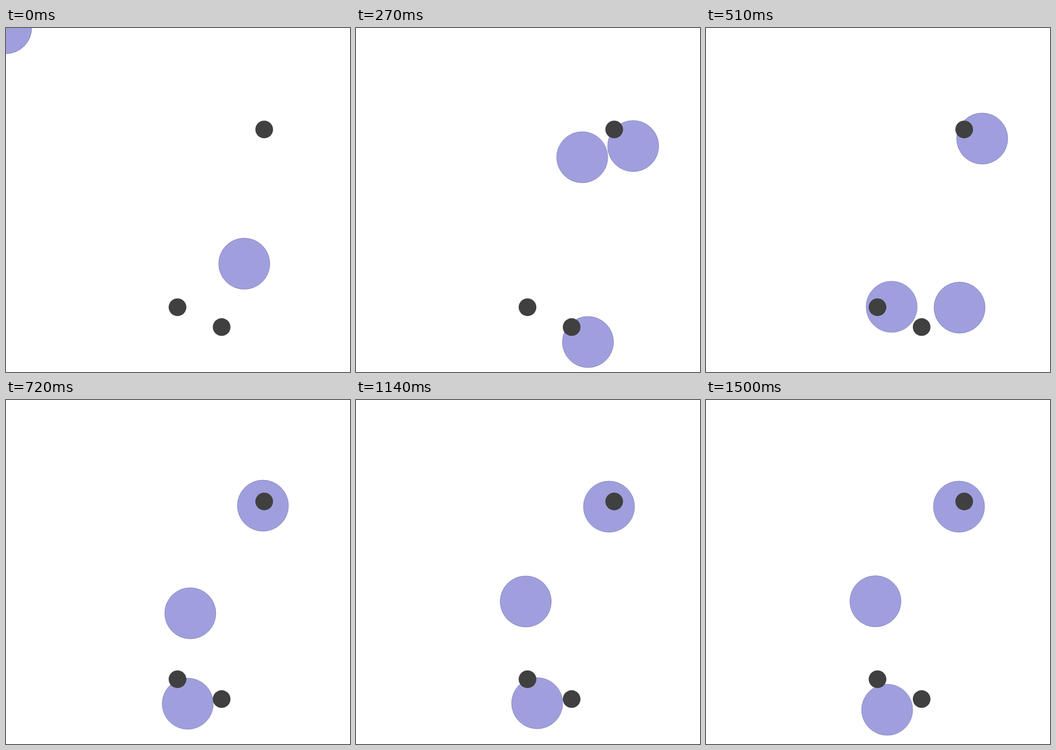
An HTML page without scripts for the animation above (1530 ms loop, 700 by 700 pixels).

```html
<!DOCTYPE html>
<html lang="en">
<head>
<meta charset="utf-8">
<title>Balls and pegs</title>
<style>
  html, body { margin: 0; width: 100%; height: 100%; overflow: hidden; background: #fff; }
  svg { display: block; width: 100%; height: 100%; }

  .ball {
    r: 52px;
    fill: #a09fde;
    stroke: #7473b4;
    stroke-width: .8px;
    animation: 1530ms -2ms infinite;
  }
  .peg { r: 18px; fill: #404040; }

  .left  { animation-name: fall, nudge; }
  .right { animation-name: drift, shake; }
  .low   { animation-name: rebound; }
  .left, .right { animation-timing-function: linear, step-end; }

  /* Paths advance in 30 ms ticks, 51 per loop. */
  @keyframes fall {
    0%      { translate: 648.4px 16px;    animation-timing-function: steps(9); }
    17.647% { translate: 460.3px 263px;   animation-timing-function: steps(8); }
    33.333% { translate: 377.7px 567.3px; animation-timing-function: steps(4); }
    41.176% { translate: 372px 631px;     animation-timing-function: steps(3); }
    47.059% { translate: 369.8px 618px;   animation-timing-function: steps(7); }
    60.784%, 100% { translate: 368.6px 617px; }
  }
  @keyframes drift {
    0%      { translate: 694.5px 147px;   animation-timing-function: steps(9); }
    17.647% { translate: 564px 240.2px;   animation-timing-function: steps(8); }
    33.333% { translate: 562px 225px;     animation-timing-function: steps(3); }
    39.216% { translate: 540px 205px;     animation-timing-function: steps(4); }
    47.059% { translate: 522.7px 215px;   animation-timing-function: steps(6); }
    58.824%, 100% { translate: 514.8px 217px; }
  }
  @keyframes rebound {
    0%      { translate: 484.8px 479.6px; animation-timing-function: steps(9); }
    17.647% { translate: 472px 639px;     animation-timing-function: steps(1); }
    19.608% { translate: 471px 648px;     animation-timing-function: steps(7); }
    33.333% { translate: 516px 569px;     animation-timing-function: steps(1); }
    35.294% { translate: 477px 532px;     animation-timing-function: steps(1); }
    37.255% { translate: 448px 504px;     animation-timing-function: steps(2); }
    41.176% { translate: 406px 464px;     animation-timing-function: steps(3); }
    47.059% { translate: 375px 434px;     animation-timing-function: steps(2); }
    50.98%  { translate: 362px 423px;     animation-timing-function: steps(5); }
    60.784% { translate: 349px 413px;     animation-timing-function: steps(7); }
    74.51%  { translate: 345.4px 410px; }
    100%    { translate: 344.8px 409.6px; }
  }

  /* Balls caught on a peg keep jumping between two spots. */
  @keyframes shake {
    0%, 50.98%, 54.902%, 58.824%, 62.745%, 66.667%, 70.588%, 74.51%,
    78.431%, 82.353%, 86.275%, 90.196%, 94.118%, 98.039%, 100% { transform: none; }
    49.02%, 52.941%, 56.863%, 60.784%, 64.706%, 68.627%, 72.549%,
    76.471%, 80.392%, 84.314%, 88.235%, 92.157%, 96.078% { transform: translateX(11px); }
  }
  @keyframes nudge {
    0%, 70.588%, 80.392%, 90.196% { transform: none; }
    68.627%, 78.431%, 88.235%, 98.039%, 100% { transform: translateY(13.3px); }
  }
</style>
</head>
<body>
<svg viewBox="0 0 700 700">
  <circle class="ball left"/>
  <circle class="ball right"/>
  <circle class="ball low"/>
  <circle class="peg" cx="525.4" cy="206.4"/>
  <circle class="peg" cx="349" cy="568.2"/>
  <circle class="peg" cx="438.8" cy="608.6"/>
</svg>
</body>
</html>
```
